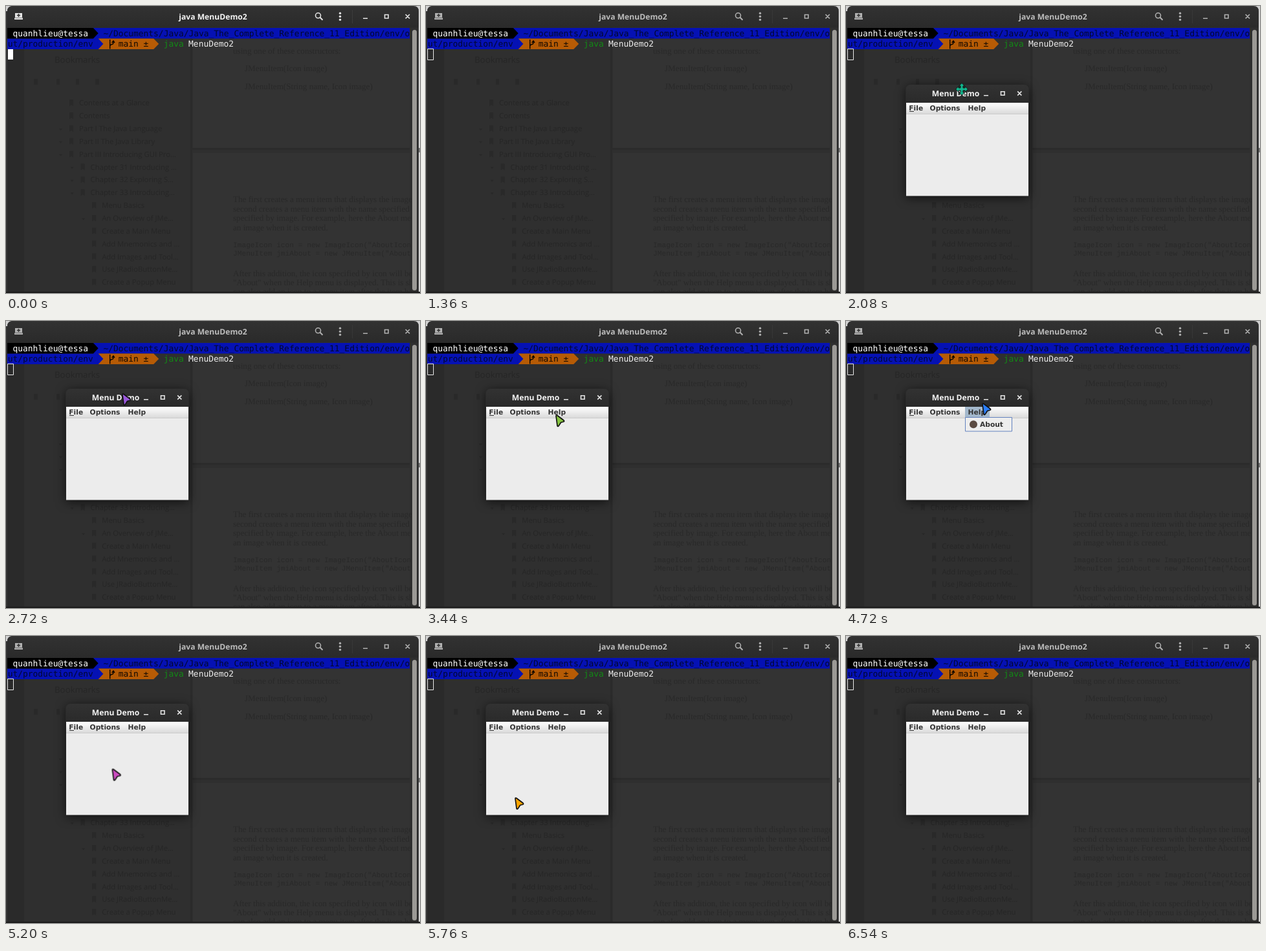
An HTML page for the animation above (6680 ms loop, 640x445 px).

```html
<!DOCTYPE html>
<html lang="en">
<head>
<meta charset="utf-8">
<title>Menu demo</title>
<style>
  html, body { margin: 0; width: 100%; height: 100%; overflow: hidden; background: #333; }
  svg { display: block; width: 640px; height: 445px; }
  text { white-space: pre; text-rendering: geometricPrecision; }
  .title { font: bold 12.15px "Open Sans", sans-serif; fill: #f4f4f4; text-anchor: middle; }
  .term { font: 12.915px "DejaVu Sans Mono", monospace; }
  .side { font: 11.3px "Open Sans", sans-serif; fill: #262626; }
  .page { font: 13.15px "Liberation Serif", serif; fill: #292929; }
  .code { font: 11.2px "Liberation Mono", monospace; }
  .menu { font: bold 10.7px "DejaVu Sans", sans-serif; fill: #333; }
  .icon { fill: none; stroke: #e4e4e4; stroke-width: 1.6; }

  .focus, .blur, .dim, .frame, .drag, .popup, .pointer, .arrow, .move, .hue {
    animation: 6680ms linear infinite;
  }
  .focus { animation-name: focus; animation-timing-function: step-end; }
  .blur { animation-name: blur; animation-timing-function: step-end; }
  .dim { animation-name: dim; animation-timing-function: step-end; }
  .frame { animation-name: open; transform-origin: 187px 191px; }
  .drag { animation-name: drag; }
  .popup { animation-name: popup; animation-timing-function: step-end; }
  .pointer { animation-name: travel; animation-timing-function: ease-in-out; }
  .arrow { animation-name: arrow; animation-timing-function: step-end; }
  .move { animation-name: move; animation-timing-function: step-end; stroke-width: 1; }
  .hue { animation-name: hue; stroke: #111; stroke-linejoin: round; }
  .arrow { stroke-width: 1.7; }

  @keyframes focus { 0% { opacity: 1 } 19.16%, 100% { opacity: 0 } }
  @keyframes blur { 0% { opacity: 0 } 19.16%, 100% { opacity: 1 } }
  @keyframes dim { 0% { opacity: 1 } 19.16%, 100% { opacity: .72 } }
  @keyframes open {
    0%, 22.7% { opacity: 0; transform: scale(.8) }
    22.75% { opacity: .3; transform: scale(.85) }
    25.1%, 100% { opacity: 1; transform: none }
  }
  @keyframes drag {
    0%, 32.3% { transform: translateY(17px) }
    39.5%, 100% { transform: translateY(0) }
  }
  @keyframes popup { 0% { opacity: 0 } 54% { opacity: 1 } 73%, 100% { opacity: 0 } }
  @keyframes travel {
    0%, 27.5% { transform: translate(236px, 190px) }
    30.8%, 32.3% { transform: translate(179px, 129px) }
    39.5%, 41% { transform: translate(179px, 112px) }
    49.5%, 54.5% { transform: translate(200px, 145px) }
    60%, 65% { transform: translate(206px, 154px) }
    70.5%, 73.5% { transform: translate(210px, 127px) }
    81%, 87.4% { transform: translate(137px, 250px) }
    91%, 100% { transform: translate(112px, 455px) }
  }
  @keyframes arrow {
    0% { opacity: 0 } 27.5% { opacity: 1 } 30% { opacity: 0 }
    40% { opacity: 1 } 91%, 100% { opacity: 0 }
  }
  @keyframes move { 0% { opacity: 0 } 30% { opacity: 1 } 40%, 100% { opacity: 0 } }
  @keyframes hue {
    0%, 27.5% { fill: #55c060 }
    31.1%, 32% { fill: #12b48c }
    37% { fill: #2a7fff }
    42% { fill: #c04bd0 }
    47% { fill: #ffa500 }
    51.5%, 52.5% { fill: #86c440 }
    61% { fill: #12b48c }
    70.6%, 71.8% { fill: #2a7fff }
    78% { fill: #d04bc0 }
    86.2%, 100% { fill: #ffa500 }
  }
</style>
</head>
<body>
<svg viewBox="0 0 640 445">
  <defs>
    <linearGradient id="bar" x2="0" y2="1">
      <stop stop-color="#323232"/><stop offset="1" stop-color="#2a2a2a"/>
    </linearGradient>
    <linearGradient id="menubar" x2="0" y2="1">
      <stop stop-color="#fff"/><stop offset="1" stop-color="#dadada"/>
    </linearGradient>
    <clipPath id="view"><path d="M2 33H627V443H2Z"/></clipPath>
  </defs>

  <!-- desktop behind -->
  <path fill="#d2d2d2" d="M0 0H8V8H0ZM630 0H640V445H630Z"/>
  <path fill="#777" d="M638 220H640V227H638Z"/>
  <path fill="#1b1b1b" d="M0 443H640V445H0Z"/>

  <!-- terminal body -->
  <path fill="#2f2f2f" d="M2 30H638V443H2Z"/>
  <path fill="#2a2a2a" d="M2 33H28V443H2Z"/>
  <path fill="#333" d="M289 33H624V220H289ZM289 228H624V443H289Z"/>
  <path fill="#2b2b2b" d="M285 33H288V443H285ZM288 220H624V223H288Z"/>
  <g id="outline" clip-path="url(#view)">
    <text class="side" x="75" y="87.5" style="font-size:13.3px">Bookmarks</text>
    <path fill="#292929" d="M43 113h6v9h-6zM78 113h5v9h-5zM108 113h5v9h-5zM138 113h6v9h-6z"/>
  </g>
  <g id="page" clip-path="url(#view)"></g>

  <!-- prompt -->
  <g class="term" transform="translate(.7 .6)">
    <path fill="#0511b4" d="M134 33.4H623.3V50H134ZM1.3 50H143V66.4H1.3Z"/>
    <path fill="#000" d="M1.3 33.4H134.2L142 41.7L134.2 50H1.3Z"/>
    <path fill="#b65b05" d="M142 50H227.5L235.5 58.2L227.5 66.4H142Z"/>
    <path fill="#0511b4" d="M141 50H142L149.7 58.2L142 66.4H141Z"/>
    <text x="9.8" y="46.4" fill="#fff">quanhlieu@tessa</text>
    <g fill="#020830">
      <text x="149.7" y="46.4">~/Documents/Java/Java_The_Complete_Reference_11_Edition/env/o</text>
      <text x="2" y="62.6">ut/production/env</text>
    </g>
    <path fill="none" stroke="#120800" stroke-width="1.5" d="M160 51.5V66M160 62Q160 59.5 163 59T165.3 54M163 56.3L165.3 53.5L167.3 56.3"/>
    <text x="173" y="62.6" fill="#120800">main ±</text>
    <text x="243" y="62.6" fill="#128a16">java</text>
    <text x="281.4" y="62.6" fill="#ececec">MenuDemo2</text>
  </g>
  <path class="focus" fill="#fff" d="M3 67H11V83H3Z"/>
  <path class="blur" fill="none" stroke="#e8e8e8" d="M2.5 66.5H11.5V83.5H2.5Z"/>
  <rect x="628" y="37" width="7" height="404" rx="3.5" fill="#9b9995"/>

  <!-- terminal title bar -->
  <path fill="url(#bar)" d="M2 33.5V8Q2 0 10 0H630Q638 0 638 8V33.5Z"/>
  <g class="dim">
    <text class="title" x="320" y="20.5">java MenuDemo2</text>
    <g class="icon">
      <path fill="#e4e4e4" stroke="none" d="M14 11H25V18H14ZM13 18.5H26V21H13Z"/>
      <path stroke="#2e2e2e" stroke-width="1.4" d="M19.5 12V17M17 14.5H22"/>
      <circle cx="482.5" cy="14.8" r="4"/>
      <path stroke-width="2" d="M485.5 17.8L489.5 21.8"/>
      <path stroke="#3c3c3c" stroke-width="1" d="M535.5 6V27"/>
      <path d="M552 19.2H559M585.5 13.5H591V19H585.5ZM617.6 13L624 19.4M624 13L617.6 19.4"/>
      <g fill="#e4e4e4" stroke="none">
        <circle cx="516.5" cy="11.3" r="1.7"/><circle cx="516.5" cy="16.3" r="1.7"/><circle cx="516.5" cy="21.3" r="1.7"/>
      </g>
    </g>
  </g>

  <!-- demo window -->
  <g class="drag"><g class="frame">
    <path fill="#2c2c2c" style="filter:drop-shadow(0 3px 8px rgba(0,0,0,.65))" d="M92.5 277.5V113Q92.5 105 100.5 105H274.5Q282.5 105 282.5 113V277.5Z"/>
    <path fill="url(#bar)" d="M92.5 133V113Q92.5 105 100.5 105H274.5Q282.5 105 282.5 113V133Z"/>
    <text class="title" x="169.5" y="123">Menu Demo</text>
    <path class="icon" d="M213 121.7H220M239.5 115.7H245V121.2H239.5ZM265.2 115.4L271.4 121.6M271.4 115.4L265.2 121.6"/>
    <path fill="#ececec" d="M93 133H282V277.5H93Z"/>
    <path fill="url(#menubar)" d="M93 133H282V150H93Z"/>
    <path fill="#ccc" d="M93 150H282V151H93Z"/>
    <path class="popup" fill="#a3b8cc" d="M184 133H222V150H184Z"/>
    <g class="menu">
      <text x="97.3" y="144.8">File</text>
      <text x="129.6" y="144.8">Options</text>
      <text x="188.6" y="144.8">Help</text>
      <path d="M98 146H105V147H98Z"/>
    </g>
    <g class="popup">
      <path fill="#eee" stroke="#6382bf" d="M184.5 149.5H256.5V171H184.5Z"/>
      <circle cx="197" cy="160.3" r="6" fill="#5c4b42"/>
      <text class="menu" x="207" y="164.3">About</text>
    </g>
  </g></g>

  <g class="pointer">
    <g class="arrow"><path class="hue" d="M1 2Q1.2 .6 2.6 1.2L13 9Q14.4 10.6 12.6 11.2L8.6 12.2L5.2 17.6Q3.8 19.4 3 17.4Z"/></g>
    <g class="move"><path class="hue" d="M0-9.5L4.5-5H2V-2H5V-4.5L9.5 0L5 4.5V2H2V5H4.5L0 9.5L-4.5 5H-2V2H-5V4.5L-9.5 0L-5-4.5V-2H-2V-5H-4.5Z"/></g>
  </g>
</svg>
<script>
  const add = (parent, tag, attrs, text = '') => {
    const el = document.createElementNS('http://www.w3.org/2000/svg', tag);
    for (const key in attrs) el.setAttribute(key, attrs[key]);
    el.textContent = text;
    parent.append(el);
  };

  // Bookmark tree: indent level, expander, label
  const tree = [
    [0, 0, 'Contents at a Glance'], [0, 0, 'Contents'],
    [0, 1, 'Part I The Java Language'], [0, 1, 'Part II The Java Library'],
    [0, 1, 'Part III Introducing GUI Pro…'],
    [1, 1, 'Chapter 31 Introducing …'], [1, 1, 'Chapter 32 Exploring S…'],
    [1, 1, 'Chapter 33 Introducing…'],
    [2, 0, 'Menu Basics'], [2, 1, 'An Overview of JMe…'], [2, 0, 'Create a Main Menu'],
    [2, 0, 'Add Mnemonics and …'], [2, 0, 'Add Images and Tool…'],
    [2, 0, 'Use JRadioButtonMe…'], [2, 0, 'Create a Popup Menu']
  ];
  const outline = document.getElementById('outline');
  tree.forEach(([level, expand, label], i) => {
    const x = 113 + level * 17.6, y = 154.3 + i * 19.85;
    add(outline, 'text', { class: 'side', x, y }, label);
    add(outline, 'path', { fill: '#292929', d: `M${x - 15} ${y - 9}h6v10l-3-2l-3 2z` });
    if (expand) add(outline, 'path', { fill: '#282828', d: `M${x - 31} ${y - 4}h5l-2.5 3z` });
  });

  const lines = [
    [351, 74, 'using one of these constructors:'],
    [369, 101, 'JMenuItem(Icon image)'],
    [369, 129, 'JMenuItem(String name, Icon image)'],
    [351, 304, 'The first creates a menu item that displays the image specified'],
    [351, 319, 'second creates a menu item with the name specified by'],
    [351, 333, 'specified by image. For example, here the About menu'],
    [351, 348, 'an image when it is created.'],
    [351, 374, 'ImageIcon icon = new ImageIcon("AboutIcon.gif");', 1],
    [351, 387, 'JMenuItem jmiAbout = new JMenuItem("About", icon);', 1],
    [351, 419, 'After this addition, the icon specified by icon will be'],
    [351, 433, '"About" when the Help menu is displayed. This is shown'],
    [351, 447, 'can also add an icon to a menu item after the item has']
  ];
  const page = document.getElementById('page');
  for (const [x, y, text, mono] of lines)
    add(page, 'text', { class: mono ? 'page code' : 'page', x, y }, text);
</script>
</body>
</html>
```
